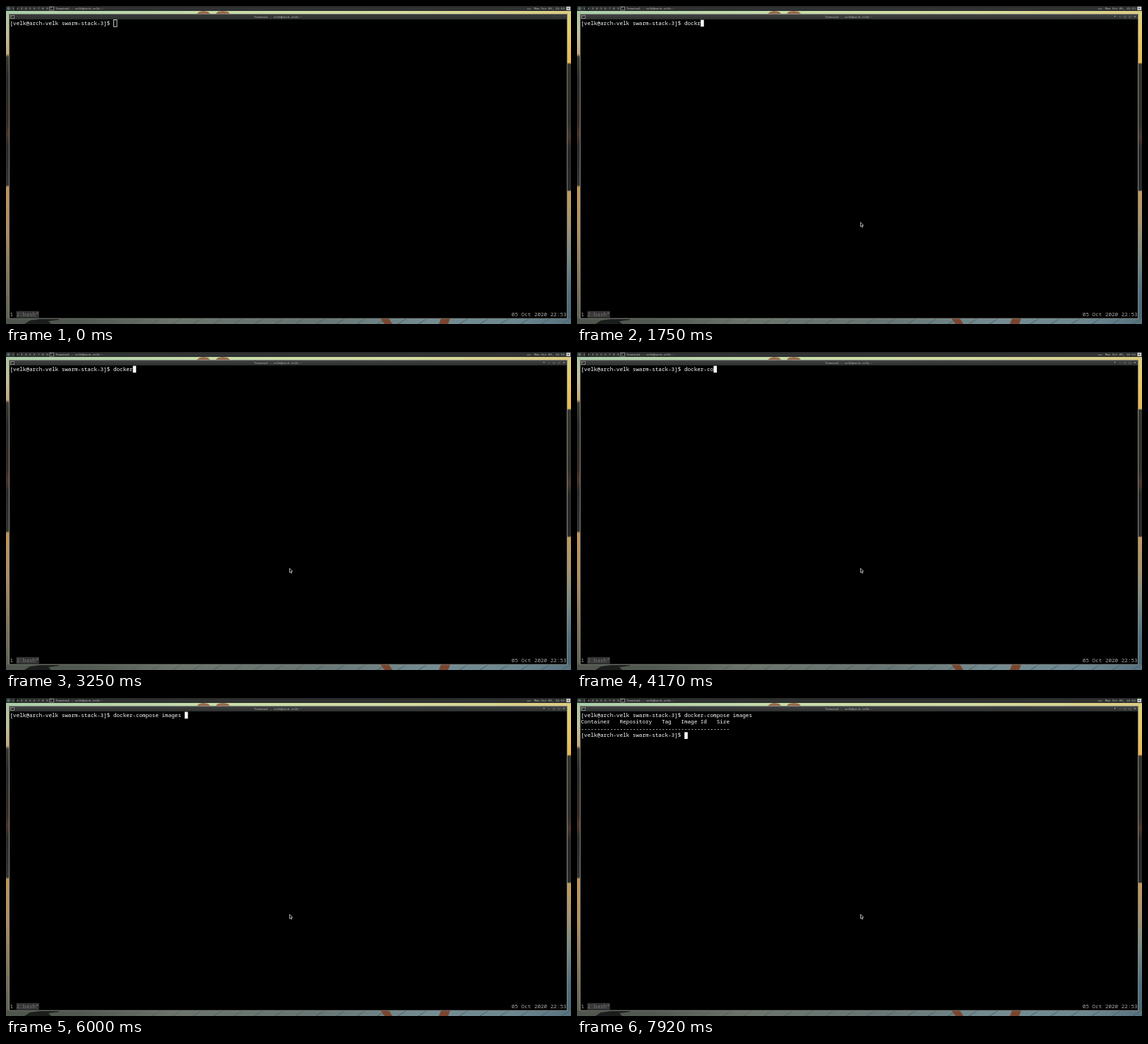
An HTML page with a canvas for the animation above (8 s loop, 800 px wide and 450 px high).

```html
<!DOCTYPE html>
<html lang="en">
<head>
<meta charset="utf-8">
<title>Terminal session</title>
<style>
  html, body { margin: 0; width: 100%; height: 100%; overflow: hidden; background: #000; }
  canvas { display: block; width: 800px; height: 450px; }
</style>
</head>
<body>
<canvas id="stage" width="800" height="450"></canvas>
<script>
const ctx = document.getElementById('stage').getContext('2d');
const LOOP = 8000;
const FOCUS_AT = 80, ENTER_AT = 6330, OUTPUT_AT = 7500, PROMPT_AT = 7750;
const CELL_W = 4.583, CELL_H = 9.583, LEFT = 5.5, TOP = 19.6;
const MONO = '"Noto Sans Mono", "DejaVu Sans Mono", monospace';
const PROMPT = '[velk@arch-velk swarm-stack-3]$ ';
const TITLE = 'Terminal - velk@arch-velk:~';
const HEADER = 'Container   Repository   Tag   Image Id   Size';

// Command line after each key press, including typos and tab completion.
const typing = [
  [0, ''], [1080, 'd'], [1170, 'do'], [1250, 'doc'], [1420, 'dock'],
  [1750, 'dockr'], [2250, 'dock'], [2330, 'docke'], [2500, 'docker'],
  [2670, 'docker '], [2830, 'docker c'], [3080, 'docker '], [3250, 'docker'],
  [3420, 'docker-'], [3500, 'docker-c'], [4080, 'docker-co'], [4250, 'docker-com'],
  [4420, 'docker-comp'], [4580, 'docker-compose '], [5000, 'docker-compose i'],
  [5500, 'docker-compose im'], [5750, 'docker-compose ima'], [6000, 'docker-compose images ']
];

function rect(x, y, w, h, color) {
  ctx.fillStyle = color;
  ctx.fillRect(x, y, w, h);
}

function gradient(x, y, w, h, vertical, stops) {
  const g = vertical ? ctx.createLinearGradient(0, y, 0, y + h) : ctx.createLinearGradient(x, 0, x + w, 0);
  stops.forEach(([at, color]) => g.addColorStop(at, color));
  rect(x, y, w, h, g);
}

function shape(points, fill, stroke) {
  ctx.beginPath();
  points.forEach(([x, y]) => ctx.lineTo(x, y));
  ctx.closePath();
  ctx.fillStyle = fill;
  ctx.fill();
  if (stroke) {
    ctx.strokeStyle = stroke;
    ctx.lineWidth = 0.7;
    ctx.stroke();
  }
}

function label(text, x, y, color, size = 4.2) {
  ctx.font = `${size}px ${MONO}`;
  ctx.fillStyle = color;
  ctx.fillText(text, x, y);
}

function print(text, col, row, color = '#fff') {
  label(text, LEFT + col * CELL_W, TOP + row * CELL_H + 7, color, 7.64);
}

function wallpaper() {
  gradient(0, 7, 800, 5, false, [[0, '#a9ceaa'], [0.35, '#c6dcaa'], [0.7, '#d4dca0'], [1, '#dccb80']]);
  shape([[269, 12], [274, 8], [279, 7], [286, 8], [290, 12]], '#986c4b');
  shape([[296, 12], [300, 8], [307, 7], [314, 8], [318, 12]], '#986c4b');
  gradient(0, 8, 5, 442, true, [
    [0, '#a9c6a0'], [0.07, '#c2c199'], [0.135, '#c6a878'], [0.145, '#3b3833'], [0.22, '#292b29'],
    [0.36, '#372b24'], [0.39, '#4e3528'], [0.43, '#2a2a28'], [0.555, '#343431'],
    [0.562, '#c09458'], [0.7, '#b18d61'], [0.85, '#837558'], [1, '#5c6054']
  ]);
  gradient(795, 8, 5, 442, true, [
    [0, '#d9d083'], [0.06, '#e8cb68'], [0.163, '#e8b850'], [0.168, '#35352f'],
    [0.36, '#30302d'], [0.4, '#4a372c'], [0.44, '#262928'], [0.571, '#282b2b'],
    [0.576, '#c39a5c'], [0.68, '#a8936d'], [0.78, '#788a86'], [0.9, '#4e7082'], [1, '#486673']
  ]);
  gradient(0, 442, 800, 8, false, [
    [0, '#50564e'], [0.13, '#505850'], [0.3, '#6c746c'], [0.55, '#687674'],
    [0.75, '#748d93'], [0.9, '#6c8790'], [1, '#587380']
  ]);
  for (let x = 90; x < 800; x += 29) shape([[x, 450], [x + 13, 442], [x + 14, 442], [x + 2, 450]], '#50605e');
  shape([[26, 450], [34, 445], [48, 443], [75, 443], [75, 444], [60, 446], [64, 450]], '#1b1e1c');
  shape([[530, 442], [542, 442], [547, 450], [536, 450]], '#79452f');
  shape([[616, 442], [629, 442], [626, 450], [613, 450]], '#79452f');
}

function terminalIcon(x, y, w, h) {
  rect(x, y, w, h, '#aaa');
  rect(x + 0.7, y + 0.7, w - 1.4, h - 1.4, '#202020');
  rect(x + 1.5, y + 1.7, 1.5, 0.7, '#ccc');
}

function panel() {
  gradient(0, 0, 800, 7, true, [[0, '#252727'], [0.5, '#333535'], [1, '#292b2b']]);
  ctx.fillStyle = '#4f7069';
  ctx.beginPath();
  ctx.arc(3.5, 3.5, 2.2, 0, 7);
  ctx.fill();
  rect(12.5, 0.5, 5, 6, '#151717');
  for (let n = 1; n <= 9; n++) label(n, 3 + n * 6, 4.9, n === 2 ? '#eee' : '#b0b3b0');
  terminalIcon(61.5, 0.8, 6.2, 5.4);
  label(TITLE, 70, 4.9, '#c2c4c2');
  label('us', 738, 4.9, '#c2c4c2');
  label('Mon Oct 05, 22:53', 748, 4.9, '#c2c4c2');
  rect(793.5, 1, 5.5, 5, '#d2d4d1');
  rect(795, 2.5, 2.5, 2, '#767a77');
}

function windowFrame(focused) {
  rect(4, 11, 791, 431.5, focused ? '#858780' : '#777a73');
  rect(5, 12, 789, 429.7, '#000');
  gradient(5, 12, 789, 7, true, [[0, focused ? '#414343' : '#383a3a'], [1, '#2d2f2f']]);
  terminalIcon(6, 13, 6, 5);
  label(TITLE, 351, 17.3, focused ? '#b8bab8' : '#c4c6c4');
  const color = focused ? '#e0e2e0' : '#555757';
  ['+', '-', '□', '□', '×'].forEach((mark, i) => label(mark, 760.5 + i * 7, 17.2, color, 4.5));
}

function cursor(col, row, focused) {
  const x = LEFT + col * CELL_W, y = TOP + row * CELL_H;
  if (focused) return rect(x, y, CELL_W, CELL_H, '#fff');
  ctx.strokeStyle = '#ddd';
  ctx.lineWidth = 0.9;
  ctx.strokeRect(x + 0.3, y - 0.1, CELL_W, CELL_H + 0.2);
}

function terminal(t, focused) {
  const command = typing.filter(([at]) => at <= t).pop()[1];
  print(PROMPT + command, 0, 0);
  if (t >= OUTPUT_AT) {
    print(HEADER, 0, 1);
    print('-'.repeat(HEADER.length), 0, 2);
  }
  if (t >= PROMPT_AT) print(PROMPT, 0, 3);

  if (t < ENTER_AT) cursor(PROMPT.length + command.length, 0, focused);
  else if (t < OUTPUT_AT) cursor(0, 1, true);
  else cursor(t < PROMPT_AT ? 0 : PROMPT.length, 3, true);

  print('1', 0, 43, '#b4b4b4');
  rect(LEFT + 2 * CELL_W, TOP + 43 * CELL_H, 7 * CELL_W, CELL_H, '#353535');
  print('2:bash*', 2, 43, '#777');
  print('05 Oct 2020 22:53', 155, 43, '#a8a8a8');
}

function pointer(x, y) {
  const outline = [[0, 0], [0, 6.2], [1.4, 5], [2.4, 7.2], [3.4, 6.7], [2.5, 4.6], [4.2, 4.4]];
  shape(outline.map(([dx, dy]) => [x + dx, y + dy]), '#111', '#e8e8e8');
}

function draw(now) {
  const t = now % LOOP, focused = t >= FOCUS_AT;
  wallpaper();
  panel();
  windowFrame(focused);
  terminal(t, focused);
  if (focused) pointer(401.4, 306);
  requestAnimationFrame(draw);
}

requestAnimationFrame(draw);
</script>
</body>
</html>
```
